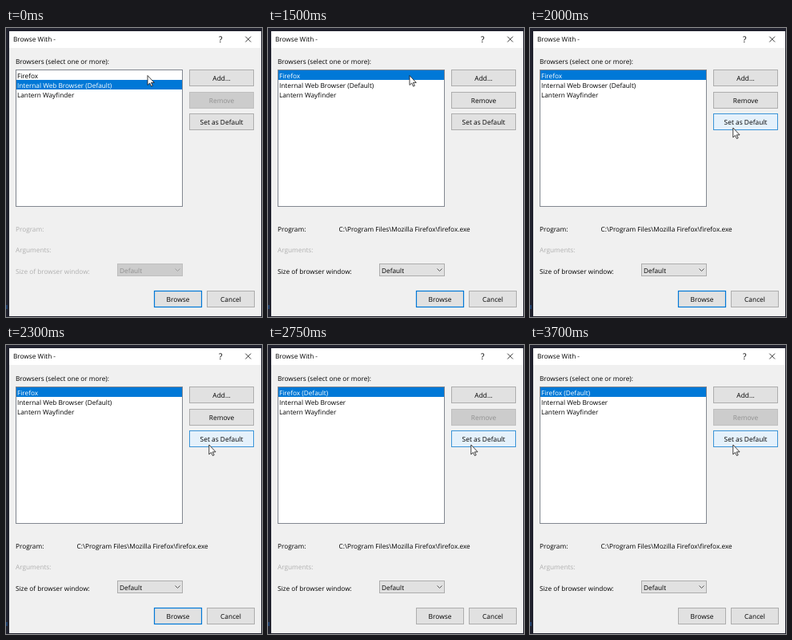
Write an HTML page that moves like this. It is 320 px wide and 362 px high and loops after 4000 ms.

```html
<!DOCTYPE html>
<html lang="en">
<head>
<meta charset="utf-8">
<title>Browse With</title>
<style>
  html, body { margin: 0; width: 100%; height: 100%; overflow: hidden; background: #20212d; }
  svg { display: block; }
  text { font: 8.25px "Open Sans", "Noto Sans", sans-serif; text-rendering: geometricPrecision; white-space: pre; }
  .button rect, .combo rect { fill: #e1e1e1; stroke: #adadad; }
  .button text { font-size: 8.4px; text-anchor: middle; }
  .combo path { fill: none; stroke: #555; }
  .off rect { fill: #ccc; stroke: #bfbfbf; }
  .off text { fill: #909090; }
  .off path { stroke: #a0a0a0; }
  text.off { fill: #b0b0b0; }
  .default rect { stroke: #0078d7; stroke-width: 1.2; }
  .hover rect { fill: #e5f1fb; stroke: #3a94d8; }
  .pressed rect { fill: #cce4f7; stroke: #4a80b0; }
  .selected rect { fill: #0078d7; }
  .selected text { fill: #fff; }
  .row rect { width: 207px; height: 12px; }
  .row:not(.selected) rect { fill: none; }
</style>
</head>
<body>
<svg id="stage" width="320" height="362" viewBox="0 0 320 362">
  <rect width="320" height="362" fill="#20212d"/>
  <rect y="347" width="2" height="5" fill="#20406c"/>
  <rect x="4" y="4" width="315" height="357" fill="#f0f0f0"/>
  <rect x="4" y="4" width="315" height="21" fill="#fff"/>
  <text x="9" y="17.3">Browse With -</text>
  <text x="266" y="18" style="font-size:10.5px">?</text>
  <path d="M299.3 10.7l6.8 6.8m0-6.8l-6.8 6.8" stroke="#222" stroke-width=".9"/>
  <text x="12" y="45">Browsers (select one or more):</text>
  <rect x="12.5" y="52.5" width="208" height="171" fill="#fff" stroke="#828790"/>
</svg>
<script>
const stage = document.getElementById('stage');

function add(tag, attrs, parent = stage, content = '') {
  const node = document.createElementNS('http://www.w3.org/2000/svg', tag);
  for (const key in attrs) node.setAttribute(key, attrs[key]);
  node.textContent = content;
  return parent.appendChild(node);
}

function label(x, y, content, parent) {
  return add('text', { x, y }, parent, content);
}

function button(x, y, width, content) {
  const group = add('g', { class: 'button' });
  add('rect', { x: x + .5, y: y + .5, width: width - 1, height: 20 }, group);
  label(x + width / 2, y + 13.5, content, group);
  return group;
}

const rows = ['Firefox', 'Internal Web Browser', 'Lantern Wayfinder'].map((name, i) => {
  const group = add('g', { class: 'row' });
  add('rect', { x: 13, y: 53 + i * 12 }, group);
  return { name, group, text: label(14, 62.8 + i * 12.1, name, group) };
});

button(229, 52, 81, 'Add...');
const remove = button(229, 80, 81, 'Remove');
const setDefault = button(229, 107, 81, 'Set as Default');
const browse = button(185, 329, 60, 'Browse');
button(251, 329, 60, 'Cancel');

const program = label(12, 255, 'Program:');
const path = label(88.5, 255, 'C:\\Program Files\\Mozilla Firefox\\firefox.exe');
label(12, 281, 'Arguments:').setAttribute('class', 'off');
const size = label(12, 308, 'Size of browser window:');

const combo = add('g', { class: 'combo' });
add('rect', { x: 139.5, y: 295.5, width: 81, height: 15 }, combo);
label(142, 306.5, 'Default', combo);
add('path', { d: 'M211.5 301.5l3 3l3-3' }, combo);

const cursor = add('path', {
  d: 'M0 0V12L2.7 9.5L4.6 13.6L6.4 12.8L4.5 8.9H8.3Z',
  fill: '#fff', stroke: '#111', 'stroke-width': .8
});

function draw(now) {
  const t = now % 4000;
  const picked = t >= 1500;
  const applied = t >= 2750;
  const pressed = t >= 2500 && !applied;
  const chosen = applied ? 0 : 1;

  rows.forEach(({ name, group, text }, i) => {
    group.classList.toggle('selected', i === (picked ? 0 : 1));
    text.textContent = name + (i === chosen ? ' (Default)' : '');
  });
  for (const node of [program, size, combo]) node.classList.toggle('off', !picked);
  path.style.display = picked ? '' : 'none';
  remove.classList.toggle('off', !picked || applied);
  setDefault.classList.toggle('hover', t >= 2000);
  setDefault.classList.toggle('pressed', pressed);
  browse.classList.toggle('default', t < 2500);

  const [x, y] = t < 1750 ? [177, 59.5] : t < 2000 ? [190.5, 76] : [253.8, 125];
  cursor.setAttribute('transform', `translate(${x} ${y})`);
  requestAnimationFrame(draw);
}
draw(0);
</script>
</body>
</html>
```
